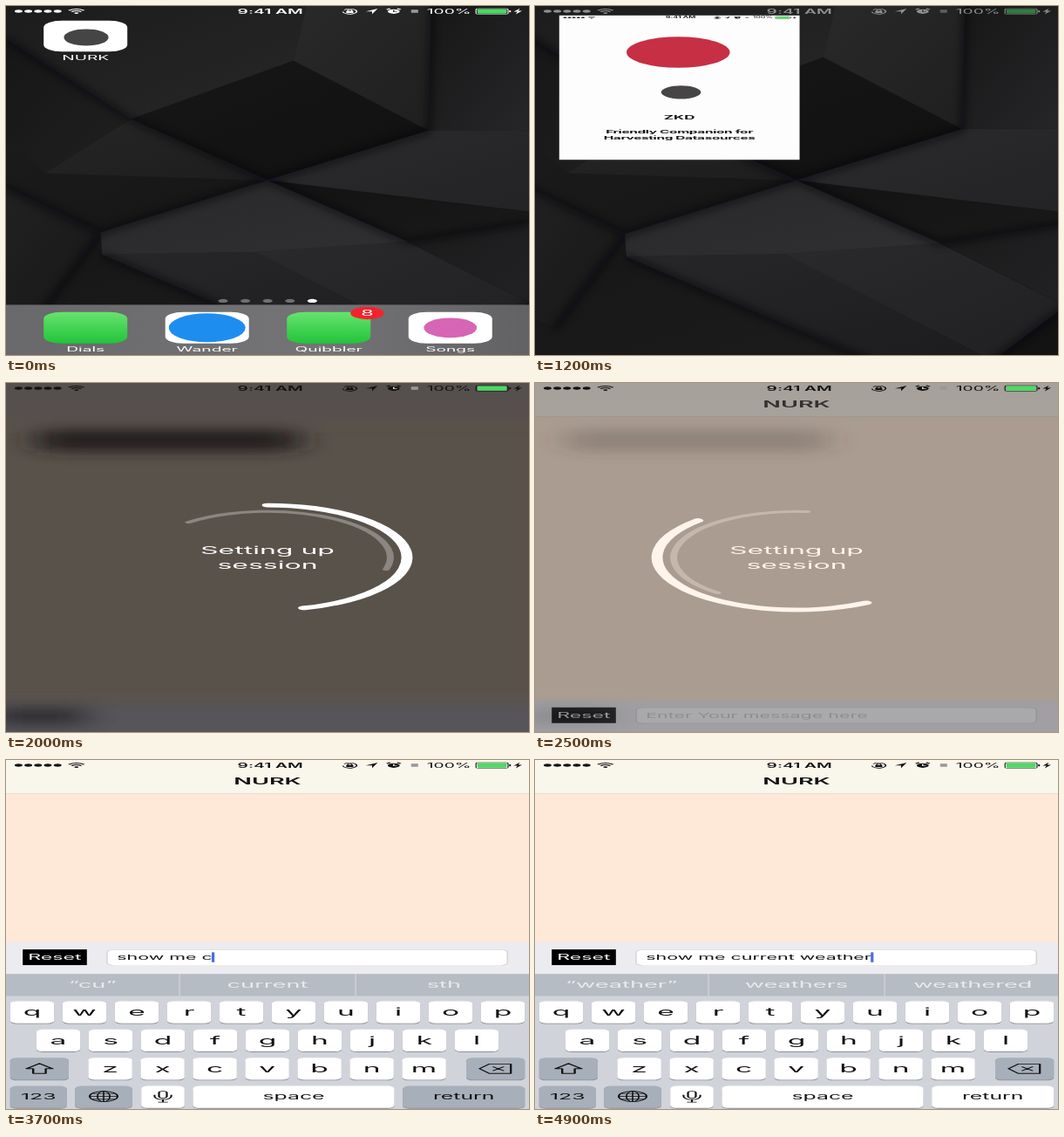
Write an HTML page that moves like this. It is 600x400 px and loops after 5000 ms.

```html
<!DOCTYPE html>
<html lang="en">
<head>
<meta charset="utf-8">
<title>Chat demo</title>
<style>
html, body { margin: 0; width: 100%; height: 100%; overflow: hidden; background: #1c1b1d; }
svg { display: block; width: 100vw; height: 100vh; }
text { font-family: Inter, "Liberation Sans", sans-serif; white-space: pre; }
</style>
</head>
<body>
<!-- A 375 x 667 portrait screen shown squashed into a wide stage -->
<svg id="stage" viewBox="0 0 375 667" preserveAspectRatio="none"></svg>
<script>
const W = 375, H = 667, LOOP = 5000, STEP = 100;
const MESSAGE = 'show me current weather';
const APP = 'NURK';

const clamp = v => Math.max(0, Math.min(1, v));
const smooth = v => v * v * (3 - 2 * v);
const mix = (a, b, k) => a + (b - a) * k;

const rect = (x, y, w, h, fill, r = 0, more = '') =>
  `<rect x="${x}" y="${y}" width="${w}" height="${h}" rx="${r}" fill="${fill}" ${more}/>`;
const circle = (x, y, r, fill, more = '') =>
  `<circle cx="${x}" cy="${y}" r="${r}" fill="${fill}" ${more}/>`;
const label = (x, y, size, fill, str, weight = 400, anchor = 'middle', more = '') =>
  `<text x="${x}" y="${y}" font-size="${size}" fill="${fill}" font-weight="${weight}" text-anchor="${anchor}" ${more}>${str}</text>`;
const line = (d, color, width, more = '') =>
  `<path d="${d}" fill="none" stroke="${color}" stroke-width="${width}" ${more}/>`;
const group = (id, body, more = '') => `<g id="${id}" ${more}>${body}</g>`;

function statusBar(color) {
  const c = 'currentColor';
  let s = '';
  for (let i = 0; i < 5; i++) s += circle(9 + 7 * i, 10, 2.8, c);
  s += line('M45 8.5Q50.5 3 56 8.5M47 11Q50.5 7.5 54 11', c, 1.6) + circle(50.5, 13.5, 1.6, c);
  s += label(189.5, 14.5, 12, c, '9:41 AM', 600);
  s += line('M242.5 7.5A5 5 0 1 1 241.5 11', c, 1) + rect(244, 9.5, 5, 4, c)
     + line('M245 10V8.5a1.5 1.5 0 0 1 3 0V10', c, 1);
  s += `<path d="M266.5 5L258 10.5H262.5V15.5Z" fill="${c}"/>`;
  s += circle(278, 10.5, 4.3, c) + line('M273 7L275.5 4.8M283 7L280.5 4.8', c, 1.5)
     + line('M278 8V10.8H280.5', color === '#fff' ? '#222' : '#fff', 1);
  s += rect(290.5, 7, 5, 6, '#999');
  s += label(333.5, 14.5, 12, c, '100%', 400, 'end');
  s += rect(337, 5, 23, 10.5, 'none', 1.5, `stroke="${c}" stroke-width=".7"`)
     + rect(338, 6, 21, 8.5, '#4cd964', 1) + rect(360.8, 8.5, 1.2, 3.5, c);
  s += `<path d="M368.5 4.5L364 11H366.7L365.5 16L370 9H367.3Z" fill="${c}"/>`;
  return `<g color="${color}">${s}</g>`;
}

function wallpaper() {
  const facets = [
    ['0,0 345,0 330,63 143,130 0,38', '#1c1c1d', '#272728'],
    ['345,0 488,0 485,143 330,63', '#29292a', '#1f1f20'],
    ['488,0 600,0 600,143 485,143', '#171718', '#262628'],
    ['143,130 330,63 485,143 300,200', '#171718', '#101011'],
    ['485,143 600,143 600,236 300,200', '#2b2a2c', '#232224'],
    ['300,200 600,236 600,248 460,270', '#121213', '#1a1a1b'],
    ['0,38 143,130 45,192 0,155', '#161617', '#202021'],
    ['143,130 300,200 45,192', '#262627', '#1d1d1e'],
    ['0,155 45,192 300,200 108,260 0,208', '#1b1b1c', '#151516'],
    ['0,208 108,260 30,365 0,350', '#212122', '#171718'],
    ['108,260 300,200 460,270 288,282 110,285', '#29292b', '#2f2f31'],
    ['110,285 288,282 520,400 380,400 245,343', '#272729', '#1c1c1e'],
    ['288,282 460,270 600,340 520,400', '#2a2a2c', '#202022'],
    ['460,270 600,248 600,340', '#1a1a1b', '#222224'],
    ['108,260 110,285 245,343 380,400 0,400 0,350 30,365', '#161617', '#1c1c1d'],
    ['600,340 600,400 520,400', '#101011', '#141415']
  ];
  const shapes = facets.map(([points, from, to], i) =>
    `<linearGradient id="facet${i}" x2="1" y2="1"><stop stop-color="${from}"/><stop offset="1" stop-color="${to}"/></linearGradient>` +
    `<polygon points="${points}" fill="url(#facet${i})" stroke="${from}" stroke-width=".6"/>`).join('');
  const creases = line('M0 38L143 130L300 200L485 143L488 0M300 200L108 260L0 208M300 200L460 270L600 248M108 260L30 365M110 285L245 343L380 400M600 340L520 400',
    '#060607', 7, 'opacity=".5" filter="url(#soft)"');
  return `<g transform="scale(.625 1.6675)">${shapes}${creases}</g>`;
}

function dock() {
  const names = ['Dials', 'Wander', 'Quibbler', 'Songs'];
  const tiles = ['url(#green)', '#fff', 'url(#green)', '#fff'];
  let s = rect(0, 571, W, 96, 'url(#dockFill)');
  names.forEach((name, i) => {
    const x = 27 + 87.2 * i;
    s += rect(x, 585, 60, 60, tiles[i], 13) + label(x + 30, 661, 12, '#fff', name);
  });
  return s + circle(144.2, 615, 27.5, '#1e8df0') + circle(318.6, 615, 19, '#d765b5')
    + circle(259, 587, 12, '#f5222d') + label(259, 592.5, 15, '#fff', '8');
}

function homeIcons() {
  let s = circle(57.5, 60, 16, '#454545') + label(57, 104, 12, '#fff', APP) + dock();
  for (let i = 0; i < 5; i++) s += circle(155.6 + 16 * i, 563.5, 3.5, i < 4 ? '#6f6f71' : '#fff');
  return s;
}

function splash() {
  const tight = 'letter-spacing="-.5"';
  return rect(0, 0, W, H, '#fdfdfd') + statusBar('#111')
    + '<ellipse cx="185.6" cy="170" rx="80.6" ry="71.7" fill="#c72f45"/>'
    + circle(190, 355, 31, '#474546')
    + label(187.5, 481, 23, '#111', 'ZKD', 700)
    + label(187.5, 544, 21, '#111', 'Friendly Companion for', 700, 'middle', tight)
    + label(187.5, 572, 21, '#111', 'Harvesting Datasources', 700, 'middle', tight);
}

function key(x, y, w, str, { fill = '#fff', size = 21, id = '' } = {}) {
  return rect(x, y + 1.5, w, 42, '#8b9097', 5) + rect(x, y, w, 42, fill, 5, id && `id="${id}"`)
    + label(x + w / 2, y + (size > 18 ? 28 : 26), size, '#111', str);
}

function keyboard() {
  const grey = '#a7afba', y3 = 569, y4 = 623;
  let s = rect(0, 409, W, 258, '#d0d4da') + rect(0, 409, W, 42, '#b6bcc4')
    + rect(124, 409, .8, 42, '#d0d4da') + rect(250.3, 409, .8, 42, '#d0d4da');
  s += group('hints', [62, 187.5, 314].map(x => label(x, 435, 17, '#eef0f2', '')).join(''));
  [['qwertyuiop', 3, 461], ['asdfghjkl', 21.75, 515], ['zxcvbnm', 59, y3]].forEach(([row, x, y]) => {
    [...row].forEach((ch, i) => s += key(x + 37.5 * i, y, 31.5, ch));
  });
  s += key(3, y3, 42, '', { fill: grey }) + key(330, y3, 42, '', { fill: grey });
  s += line('M24 580L33.5 590H28.5V599H19.5V590H14.5Z', '#111', 1.5, 'stroke-linejoin="round"');
  s += line('M346.5 581H362V599H346.5L339.5 590ZM349 586L357 594M357 586L349 594', '#111', 1.4, 'stroke-linejoin="round"');
  s += key(3, y4, 40.5, '123', { fill: grey, size: 15.5 }) + key(49.5, y4, 41, '', { fill: grey })
    + key(97, y4, 31, '') + key(134, y4, 144.5, 'space', { size: 15.5 })
    + key(284.5, y4, 87.5, 'return', { fill: grey, size: 15.5, id: 'returnKey' });
  s += circle(70, 643, 10, 'none', 'stroke="#111" stroke-width="1.3"')
    + '<ellipse cx="70" cy="643" rx="4.5" ry="10" fill="none" stroke="#111" stroke-width="1.1"/>'
    + line('M60 643H80M70 633V653M62 637.5H78M62 648.5H78', '#111', 1);
  s += rect(109.7, 633, 5.6, 13, 'none', 2.8, 'stroke="#111" stroke-width="1.4"')
    + line('M106.5 640V643a6 6 0 0 0 12 0V640M112.5 649V654M109 654H116', '#111', 1.3);
  return s;
}

function chat() {
  const bar = rect(0, 348, W, 61, '#ecebef') + rect(12, 362, 46, 30, '#000')
    + label(35, 382.5, 14.5, '#fff', 'Reset')
    + rect(72.5, 362.5, 287, 30, '#fff', 5, 'stroke="#cfcfd3" stroke-width=".8"')
    + label(79.5, 381.5, 13.4, '#111', '', 400, 'start', 'id="entry"')
    + rect(79, 367.5, 2, 19, '#4a6de0', 0, 'id="caret"');
  return rect(0, 0, W, H, '#fee9d8') + rect(0, 0, W, 63.5, '#f9f6ec') + rect(0, 63.5, W, .8, '#d8d0c4')
    + statusBar('#111') + label(187.5, 47.5, 17, '#111', APP, 600)
    + group('panel', bar + keyboard());
}

function arc(id, r, from, to, color, width) {
  const at = deg => {
    const a = deg * Math.PI / 180;
    return `${187.5 + r * Math.cos(a)} ${333.5 + r * Math.sin(a)}`;
  };
  return line(`M${at(from)}A${r} ${r} 0 0 1 ${at(to)}`, color, width, `id="${id}" stroke-linecap="round"`);
}

function loader() {
  return rect(0, 0, W, H, '#59524b')
    + `<g filter="url(#blur)">${rect(-40, -40, W + 80, 112, '#54504d')}${rect(-40, 610, W + 80, 100, '#57555a')}`
    + `${rect(22, 88, 188, 42, '#211f1d', 10)}${rect(-10, 620, 68, 34, '#2c2b2d')}</g>`
    + statusBar('#111')
    + arc('outer', 100, -90, 75, '#fff', 8) + arc('inner', 88, -130, 15, '#8b8681', 5)
    + label(187.5, 327.5, 20, '#fff', 'Setting up') + label(187.5, 354.5, 20, '#fff', 'session');
}

const stage = document.getElementById('stage');
stage.innerHTML = `<defs>
  <filter id="soft" x="-10%" y="-10%" width="120%" height="120%"><feGaussianBlur stdDeviation="4"/></filter>
  <filter id="blur" x="-20%" y="-20%" width="140%" height="140%"><feGaussianBlur stdDeviation="12"/></filter>
  <linearGradient id="green" x2="0" y2="1"><stop stop-color="#67e36e"/><stop offset="1" stop-color="#22c33a"/></linearGradient>
  <linearGradient id="dockFill" x2="1" y2="0"><stop stop-color="#69686a"/><stop offset=".6" stop-color="#747375"/><stop offset="1" stop-color="#626163"/></linearGradient>
  </defs>`
  + group('home', group('wall', wallpaper()) + group('homeBar', statusBar('#fff'))
    + rect(27, 28, 60, 59, '#fff', 13, 'id="tile"') + group('icons', homeIcons()))
  + group('launch', splash()) + group('chat', chat()) + group('loader', loader());

const $ = id => document.getElementById(id);
const set = (id, name, value) => $(id).setAttribute(name, value);
const show = (id, alpha) => {
  set(id, 'opacity', alpha);
  set(id, 'display', alpha > 0 ? 'inline' : 'none');
};

// Suggestions by number of typed letters
const HINTS = [
  [0, 'i', 'I', 'sho'], [1, '“sh”', 'she', 'show'], [4, '“show”', 'shows', 'showed'],
  [6, '“me”', 'men', 'met'], [9, '“cu”', 'current', 'sth'], [11, '“curr”', 'current', 'currently'],
  [16, '“we”', 'we', 'weather'], [19, '“weat”', 'weather', 'weathers'],
  [23, '“weather”', 'weathers', 'weathered']
];

function typedCount(t) {
  if (t <= 3700) return Math.round(9 * clamp((t - 2900) / 800));
  return 9 + Math.round(14 * clamp((t - 3700) / 1100));
}

function drawHome(t) {
  const p = smooth(clamp((t - 950) / 620));
  const grow = 1 + .08 * p;
  set('wall', 'transform', `translate(187.5 333.5) scale(${grow}) translate(-187.5 -333.5)`);
  show('home', t < 1900 ? 1 : 0);
  show('icons', clamp(1 - 3 * p));
  show('homeBar', clamp(1 - 1.4 * p));
  show('tile', p > 0 ? 0 : 1);
  show('launch', t <= 1900 ? clamp(5 * p) : 0);
  set('launch', 'transform',
    `translate(${mix(27, 0, p)} ${mix(28, 0, p)}) scale(${mix(60 / W, 1, p)} ${mix(59 / H, 1, p)})`);
}

function drawLoader(t) {
  show('loader', clamp((t - 1800) / 200) * clamp((2600 - t) / 200));
  const turn = (id, deg) => set(id, 'transform', `rotate(${deg} 187.5 333.5)`);
  turn('outer', (t - 2000) * .3);
  turn('inner', (t - 2000) * -.2);
}

function drawChat(t) {
  show('chat', t >= 2000 ? 1 : 0);
  set('panel', 'transform', `translate(0 ${258 * (1 - clamp((t - 2600) / 400)) ** 2.3})`);
  const n = typedCount(t), entry = $('entry');
  entry.textContent = n ? MESSAGE.slice(0, n) : 'Enter Your message here';
  entry.setAttribute('fill', n ? '#111' : '#c3c3c8');
  set('caret', 'x', 79 + (n && t >= 2000 ? entry.getComputedTextLength() : 0));
  set('caret', 'opacity', t >= 2700 ? 1 : 0);
  const words = HINTS.filter(h => h[0] <= n).pop();
  [...$('hints').children].forEach((el, i) => el.textContent = words[i + 1]);
  set('hints', 'opacity', n ? .9 : .4);
  set('returnKey', 'fill', t >= 4900 ? '#fff' : '#a7afba');
}

function draw(t) {
  drawHome(t);
  drawLoader(t);
  drawChat(t);
}

const start = performance.now();
function tick() {
  const t = (performance.now() - start) % LOOP;
  draw(Math.floor(t / STEP) * STEP);
  requestAnimationFrame(tick);
}
tick();
</script>
</body>
</html>
```
